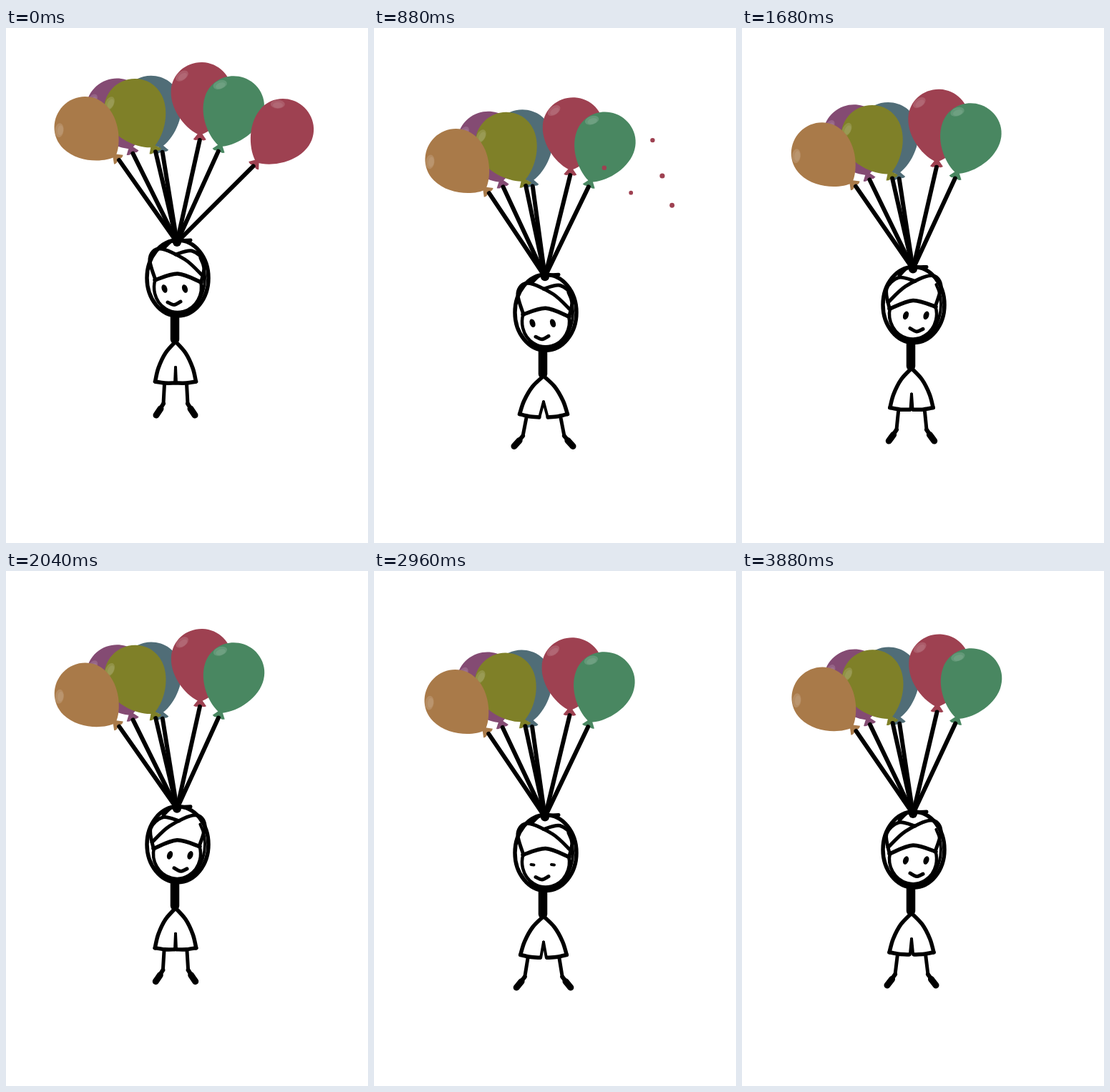
An HTML page with a canvas for the animation above (3.92 s loop, 506 by 721 pixels).

```html
<!DOCTYPE html>
<html lang="en">
<head>
<meta charset="utf-8">
<title>Balloons</title>
<style>
html, body { margin: 0; width: 100%; height: 100%; overflow: hidden; background: #fff; }
canvas { display: block; }
</style>
</head>
<body>
<canvas id="stage" width="506" height="721"></canvas>
<script>
const ctx = document.getElementById('stage').getContext('2d');
const LOOP = 3920, STEP = 40, POP = 400, GONE = 520;
const TURNS = [0, 900, 2130, 3300, 4440]; // bob alternates: high, low, high...
const KNOT = [239, 300], RED = '#9e4151';

// Neck x, y, tilt in degrees, colour; back to front
const BALLOONS = [
  [217, 167, -14, '#506d77'],
  [175, 169, -20, '#844b73'],
  [206, 167, -26, '#7f8028'],
  [153, 180, -46, '#a97a49'],
  [271, 150, 2, RED],
  [299, 166, 19, '#498761'],
  [350, 188, 39, RED]
];

let seed = 7;
const random = () => (seed = seed * 16807 % 2147483647) / 2147483647;

// Scraps of the burst balloon, spread like sunflower seeds
const SCRAPS = Array.from({ length: 26 }, (_, i) => {
  const angle = i * 2.4, far = 11 * Math.sqrt(i + .5) + random() * 6;
  return { x: Math.cos(angle) * far, y: Math.sin(angle) * far,
    r: 16 + random() * 6, life: i < 5 ? 480 : 180 + random() * 140 };
});

const clamp = v => Math.max(0, Math.min(1, v));
const smooth = k => k * k * (3 - 2 * k);

// Smooth curve through a flat list of x, y
function curve(p, width) {
  const last = p.length / 2 - 1;
  const at = i => {
    i = Math.max(0, Math.min(last, i));
    return [p[2 * i], p[2 * i + 1]];
  };
  ctx.beginPath();
  ctx.moveTo(p[0], p[1]);
  for (let i = 0; i < last; i++) {
    const [a, b, c, d] = [at(i - 1), at(i), at(i + 1), at(i + 2)];
    ctx.bezierCurveTo(b[0] + (c[0] - a[0]) / 6, b[1] + (c[1] - a[1]) / 6,
      c[0] - (d[0] - b[0]) / 6, c[1] - (d[1] - b[1]) / 6, c[0], c[1]);
  }
  ctx.lineWidth = width;
  ctx.stroke();
}

function arc(x, y, rx, ry, from, to, width) {
  ctx.beginPath();
  ctx.ellipse(x, y, rx, ry, 0, from, to);
  ctx.lineWidth = width;
  ctx.stroke();
}

function oval(x, y, rx, ry, turn, fill) {
  ctx.beginPath();
  ctx.ellipse(x, y, rx, ry, turn, 0, 7);
  ctx.fillStyle = fill;
  ctx.fill();
}

function balloon([x, y, tilt, colour]) {
  ctx.save();
  ctx.translate(x, y);
  ctx.rotate(tilt * Math.PI / 180);
  ctx.fillStyle = colour;
  ctx.beginPath();
  ctx.moveTo(0, 0);
  ctx.bezierCurveTo(-18, -6, -42.5, -32, -42.5, -60);
  ctx.bezierCurveTo(-42.5, -85, -22, -102, 0, -102);
  ctx.bezierCurveTo(22, -102, 42.5, -85, 42.5, -60);
  ctx.bezierCurveTo(42.5, -32, 18, -6, 0, 0);
  ctx.fill();
  ctx.beginPath();
  ctx.moveTo(-3, -2);
  ctx.lineTo(-9, 6);
  ctx.quadraticCurveTo(-5, 9, 0, 5);
  ctx.quadraticCurveTo(5, 9, 9, 6);
  ctx.lineTo(3, -2);
  ctx.fill();
  oval(-28, -82, 10, 6, -.66, 'rgba(255,255,255,.14)');
  oval(-27, -81, 7, 4, -.66, 'rgba(255,255,255,.08)');
  ctx.restore();
}

function string([x, y, tilt]) {
  const a = tilt * Math.PI / 180;
  curve([x - 7 * Math.sin(a), y + 7 * Math.cos(a), ...KNOT], 6);
}

function bunch(s, count) {
  const held = BALLOONS.slice(0, count);
  ctx.save();
  ctx.translate(...KNOT);
  ctx.rotate(s * .025);
  ctx.translate(-KNOT[0], -KNOT[1]);
  held.forEach(balloon);
  held.forEach(string);
  ctx.restore();
}

function burst(t) {
  const u = t - POP;
  if (u < 0) return;
  const spread = 2.4 * (1 - Math.exp(-u / 150));
  const fall = 60 * (u / 480) ** 2;
  for (const { x, y, r, life } of SCRAPS) {
    const size = r * Math.min(1, .4 + u / 133) * clamp(1 - (u - 80) / life);
    if (size < .5) continue;
    oval(385 + x * spread, 147 + y * spread + fall, size, size, 0, RED);
    if (size > 6) {
      ctx.save();
      ctx.strokeStyle = '#c5a3a8';
      ctx.lineWidth = .8;
      ctx.stroke();
      ctx.restore();
    }
  }
}

function head(right, blink) {
  arc(240, 350, 43, 53, 0, 7, 5.5);
  arc(240, 350, 38, 50, -.6, 2.2, 4);
  curve([220, 309, 230, 299, 239, 298, 258, 297], 5);
  oval(...KNOT, 6, 6, 0, '#000');
  ctx.save();
  if (right) {
    ctx.translate(479, 0);
    ctx.scale(-1, 1);
  }
  curve([209, 353, 201, 323, 215, 309, 250, 324, 275, 347], 5);
  curve([237, 317, 260, 312, 277, 328, 273, 355], 5);
  curve([208, 353, 240, 344, 273, 356], 5.5);
  arc(240, 363, 33, 35, -.25, Math.PI + .3, 4.5);
  for (const x of [221.5, 250]) {
    if (blink) curve([x - 2, 366.5, x + 2, 367], 4);
    else oval(x, 365, 3.8, 6, -.35, '#000');
  }
  curve([226, 384, 235, 387.5, 244, 383], 5);
  ctx.restore();
}

function body(s) {
  curve([236, 403, 236, 436], 12.5);
  for (const side of [-1, 1]) {
    ctx.save();
    ctx.translate(237, 438);
    ctx.scale(side, 1);
    curve([0, 37, 1 + 5 * s * s, 59], 4);
    ctx.rotate(-.09 * s);
    curve([-1, 0, 14, 17, 24, 38, 28.5, 57], 5.5);
    curve([28.5, 57, 15, 59, 1, 59], 5.5);
    ctx.rotate(-.05 * s);
    curve([15.5, 60, 17, 88], 5);
    curve([17, 88, 27, 104], 6);
    curve([21, 95, 27, 104], 9);
    ctx.restore();
  }
}

function draw(t) {
  const turn = TURNS.findLastIndex(at => at <= t);
  const k = (t - TURNS[turn]) / (TURNS[turn + 1] - TURNS[turn]);
  const eased = k - .05 * Math.sin(2 * Math.PI * k);
  const falling = turn % 2 === 0;
  const s = falling ? eased : 1 - eased;
  ctx.fillStyle = '#fff';
  ctx.fillRect(0, 0, 506, 721);
  ctx.strokeStyle = '#000';
  ctx.lineCap = ctx.lineJoin = 'round';
  ctx.save();
  ctx.translate(0, 16.5 * s + 32 * smooth(clamp((t - 560) / 260)));
  bunch(s, t < GONE ? 7 : 6);
  head(!falling, t >= 2880 && t < 3040);
  body(s);
  ctx.restore();
  burst(t);
}

function tick() {
  const t = performance.now() % LOOP;
  draw(Math.floor(t / STEP) * STEP);
  requestAnimationFrame(tick);
}
tick();
</script>
</body>
</html>
```
